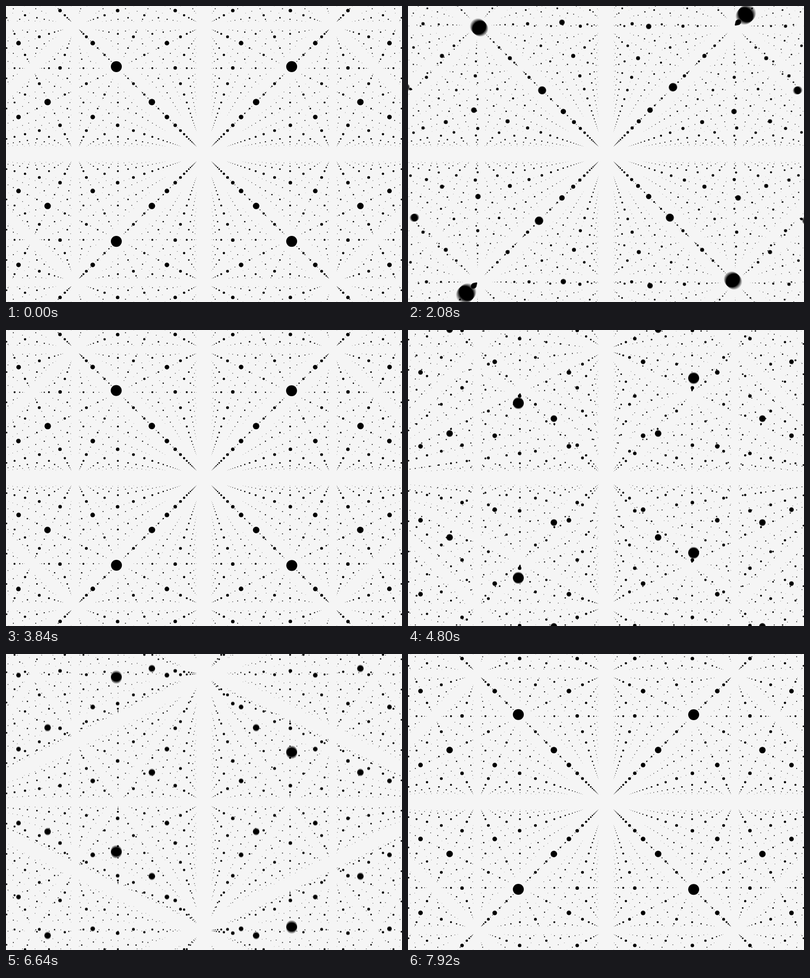
Animation of 800x600 px, one loop 8 s. Source, as an HTML page with a canvas:

```html
<!DOCTYPE html>
<html lang="en">
<head>
<meta charset="utf-8">
<title>Sliding lattice</title>
<style>
  html, body { margin: 0; width: 100%; height: 100%; overflow: hidden; background: #f5f5f5; }
  canvas { display: block; }
</style>
</head>
<body>
<canvas id="stage" width="800" height="600"></canvas>
<script>
const W = 800, H = 600;
const LOOP = 8000, STEP = 80, STEPS = LOOP / STEP;
const SAMPLES = 5, SHUTTER = 0.6;   // motion blur
const FOCAL = 300 / Math.tan(Math.PI / 6);
const NEAR = 1.467, FAR = 17.4, LAYERS = 17;
const BACK = '#f5f5f5', INK = '#000';

const ctx = document.getElementById('stage').getContext('2d');
const layer = document.createElement('canvas');
layer.width = W;
layer.height = H;
const pen = layer.getContext('2d');

function ease(p) {
  const a = Math.pow(p, 1.89), b = Math.pow(1 - p, 1.89);
  return a / (a + b);
}

const isOdd = n => (n & 1) !== 0;

function dot(x, y, z) {
  const scale = FOCAL / z;
  const px = W / 2 + x * scale, py = H / 2 + y * scale;
  const r = 0.2 + 16 / z * (1 - (z / FAR) ** 2);
  if (px < -r || px > W + r || py < -r || py > H + r) return;
  if (r < 0.8) {
    const side = r * Math.sqrt(Math.PI);
    pen.fillRect(px - side / 2, py - side / 2, side, side);
  } else {
    pen.beginPath();
    pen.arc(px, py, r, 0, Math.PI * 2);
    pen.fill();
  }
}

// First half: rows slide in depth. Second half: rows slide vertically.
function drawLattice(t) {
  const deep = t < 0.5;
  const shift = ease(deep ? t * 2 : t * 2 - 1);
  pen.fillStyle = BACK;
  pen.fillRect(0, 0, W, H);
  pen.fillStyle = INK;
  for (let k = -1; k <= LAYERS; k++) {
    const base = k + NEAR;
    const reach = base + (deep ? 1 : 0);
    const nx = Math.ceil(420 * reach / FOCAL) + 1;
    const ny = Math.ceil(320 * reach / FOCAL) + 2;
    for (let i = -nx; i < nx; i++) {
      for (let j = -ny; j < ny; j++) {
        let y = j + 0.5, z = base;
        if (deep) z += isOdd(i + j) ? -shift : shift;
        else y += isOdd(i + k) ? shift : -shift;
        if (z > 0.3 && z < FAR) dot(i + 0.5, y, z);
      }
    }
  }
}

function render(step) {
  for (let s = 0; s < SAMPLES; s++) {
    drawLattice((step + SHUTTER * s / SAMPLES) / STEPS);
    ctx.globalAlpha = 1 / (s + 1);   // running average
    ctx.drawImage(layer, 0, 0);
  }
}

let start = null, shown = -1;

function tick(now) {
  if (start === null) start = now;
  const step = Math.floor(Math.max(0, now - start) % LOOP / STEP);
  if (step !== shown) {
    render(step);
    shown = step;
  }
  requestAnimationFrame(tick);
}

render(0);
requestAnimationFrame(tick);
</script>
</body>
</html>
```
